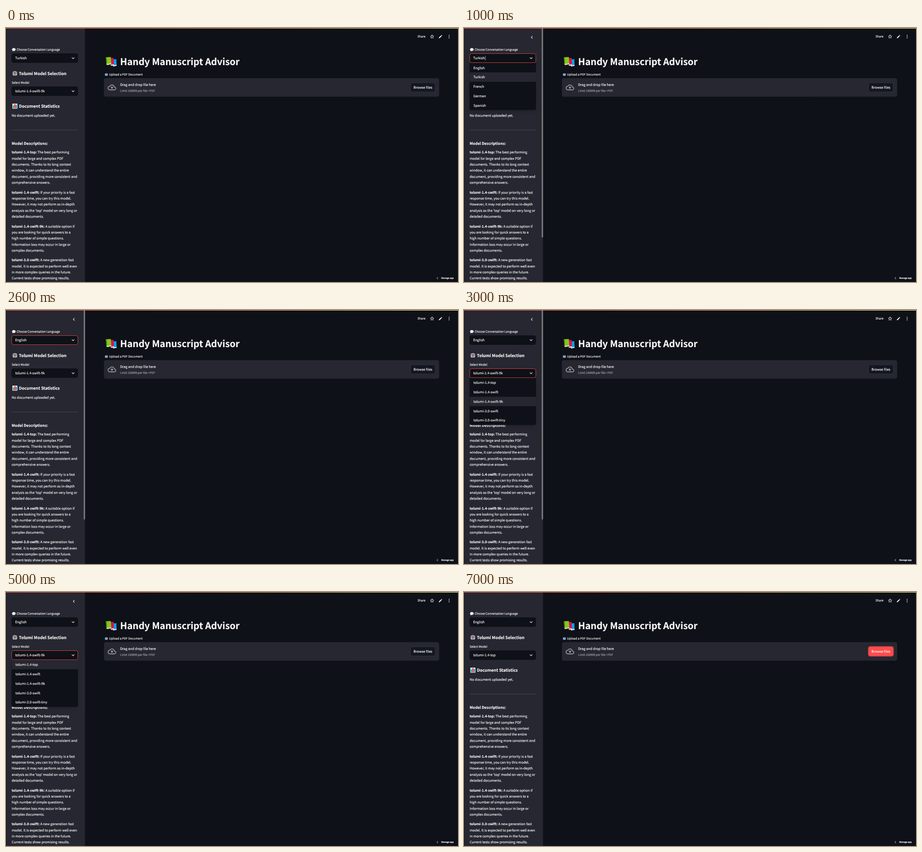
Recreate the animation shown at these times as an HTML page. Size 998 by 561 pixels, loop 8 s.

```html
<!DOCTYPE html>
<html lang="en">
<head>
<meta charset="utf-8">
<title>Document helper</title>
<style>
  html, body { margin: 0; width: 100%; height: 100%; overflow: hidden; background: #0e1117; }
  svg { display: block; width: 100vw; height: 100vh; }
  text {
    font-family: "Noto Sans CJK JP", "Noto Sans CJK SC", "Noto Sans CJK KR", "Noto Sans CJK TC", "Noto Sans CJK", "Open Sans", sans-serif;
    fill: #fafafa; stroke: #fafafa; stroke-width: .17; stroke-linejoin: round;
    text-rendering: geometricPrecision; white-space: pre;
  }
  .line { fill: none; stroke: #fafafa; stroke-linecap: round; stroke-linejoin: round; }
  .menu { filter: drop-shadow(0 2px 4px rgba(0, 0, 0, .16)); }
</style>
</head>
<body>
<svg id="stage" viewBox="0 0 998 561" preserveAspectRatio="none"></svg>
<script>
const LOOP = 8000;
const RED = '#ff4b4b', PANEL = '#262730', DARK = '#0e1117';
const BODY = 8.317, SMALL = 7.28, ROW = 20.79;
const FACE = 1.118; // the face is drawn larger per em than the sizes used here

const LANGUAGES = ['English', 'Turkish', 'French', 'German', 'Spanish'];
const MODELS = ['tolumi-1.4-top', 'tolumi-1.4-swift', 'tolumi-1.4-swift-9k', 'tolumi-3.0-swift', 'tolumi-3.0-swift-tiny'];

const ABOUT = [
  [277.3, MODELS[0], ['The best performing', 'model for large and complex PDF', 'documents. Thanks to its long context',
    'window, it can understand the entire', 'document, providing more consistent and', 'comprehensive answers.']],
  [365.8, MODELS[1], ['If your priority is a fast', 'response time, you can try this model.', 'However, it may not perform as in-depth',
    "analysis as the 'top' model on very long or", 'detailed documents.']],
  [440.7, MODELS[2], ['A suitable option if', 'you are looking for quick answers to a', 'high number of simple questions.',
    'Information loss may occur in large or', 'complex documents.']],
  [515.4, MODELS[3], ['A new generation fast', 'model. It is expected to perform well even', 'in more complex queries in the future.',
    'Current tests show promising results.']]
];

const text = (x, y, str, size = BODY, extra = '') =>
  `<text x="${x}" y="${y}" font-size="${size / FACE}" ${extra}>${str}</text>`;
const bold = (x, y, str, size) => text(x, y, str, size, 'font-weight="600"');
const rect = (x, y, w, h, fill, r = 0, extra = '') =>
  `<rect x="${x}" y="${y}" width="${w}" height="${h}" rx="${r}" fill="${fill}" ${extra}/>`;
const path = (d, fill, extra = '') => `<path d="${d}" fill="${fill}" ${extra}/>`;
const line = (d, width) => `<path class="line" d="${d}" stroke-width="${width}"/>`;
const dot = (x, y, r, fill) => `<circle cx="${x}" cy="${y}" r="${r}" fill="${fill}"/>`;

function paragraph([y, name, lines]) {
  return lines.map((s, i) => {
    const lead = i ? '' : `<tspan font-weight="600">${name}:</tspan> `;
    return text(12.5, y + i * 13.31, lead + s);
  }).join('');
}

function select(id, y) {
  return rect(12.6, y + .5, 146, 20, DARK, 3.8, `id="${id}Box" stroke-width=".8"`) +
    text(20.2, y + 13.4, '', BODY, `id="${id}Text"`) +
    line(`M145.8 ${y + 9.4}l2.4 2.4 2.4-2.4`, 1.15);
}

function menu(id, y, items) {
  const bottom = y + ROW * items.length;
  return `<g id="${id}Menu" class="menu">` +
    path(`M12.4 ${y}H159V${bottom - 4}q0 4-4 4H16.4q-4 0-4-4z`, DARK) +
    rect(12.4, y, 146.6, ROW, PANEL, 0, `id="${id}Mark"`) +
    items.map((s, i) => text(20.8, y + ROW * i + 13.3, s)).join('') + '</g>';
}

function star(cx, cy, r) {
  const points = Array.from({ length: 10 }, (_, i) => {
    const a = Math.PI * (i / 5 - .5), d = i % 2 ? r * .45 : r;
    return `${cx + d * Math.cos(a)} ${cy + d * Math.sin(a)}`;
  });
  return line(`M${points.join('L')}z`, .9);
}

const bubble = path('M17.3 44.3c2.4 0 4 1.4 4 3.2s-1.6 3.2-4 3.2l-.9-.1-2 1.2.3-1.8c-.9-.6-1.4-1.4-1.4-2.5 0-1.8 1.6-3.2 4-3.2z', '#f3f3f5');

const robot = rect(18.9, 94.4, 1.4, 2.2, '#d13438', .5) +
  rect(13.9, 98.4, 2, 4, '#d13438', .8) + rect(23.3, 98.4, 2, 4, '#d13438', .8) +
  rect(15, 95.8, 9.2, 9.2, '#c9ccd2', 2.6) + rect(15.7, 97.6, 7.8, 3.6, '#3a3d45', 1.5) +
  dot(17.6, 99.4, 1, '#fff') + dot(21.6, 99.4, 1, '#fff') + rect(17, 102.5, 5.2, 1.2, '#4a4d55', .4);

const chart = rect(14, 167, 11.2, 11.2, '#e9eef2', .8) +
  rect(15.2, 171, 2.4, 6.3, '#16a349') + rect(18.4, 168.2, 2.4, 9.1, '#e0263b') + rect(21.6, 169.7, 2.4, 7.6, '#1683d8');

const books = path('M236 69.4l7.6-.6.6 14.8-8.2 1.2z', '#0aa0ec') + path('M236 82.4l8.1-1 .1 2.2-8 1.3z', '#dff2fc') +
  path('M231 66.3l6.6-.3 1 16.4-7 1z', '#d8124f') + path('M231.6 81l6.9-.9.1 2.3-7 1z', '#f4e3ea') +
  path('M220.4 64.8l11-.9 1 14-10.7 1.4z', '#86c51b') + path('M220.4 64.8l1.8-.2 1.1 14.5-1.6.2z', '#4d8a10') +
  path('M221.7 79.3l10.7-1.4.1 2.2-10.2 1.4z', '#eef4e2') + path('M222.2 81.4l10.3-1.3v.9l-10 1.4z', '#4d8a10');

const tray = path('M218.3 102h6.5v3.7h-6.5z', '#2a8fd6') + path('M219 100.6h5.2l.6 2h-6.4z', '#b9dcf2') +
  path('M221.5 99l2 2.3h-1.2v2h-1.6v-2h-1.2z', '#d93a3f') + rect(219.6, 103.4, 3.9, 1, '#e6f3fb');

const cloud = path('M19.35 10.04A7.49 7.49 0 0 0 12 4C9.11 4 6.6 5.64 5.35 8.04A5.994 5.994 0 0 0 0 14c0 3.31 2.69 6 6 6h13c2.76 0 5-2.24 5-5 0-2.64-2.05-4.78-4.65-4.96zM19 18H6c-2.21 0-4-1.79-4-4 0-2.05 1.53-3.76 3.56-3.97l1.07-.11.5-.95A5.469 5.469 0 0 1 12 6c2.62 0 4.88 1.86 5.39 4.43l.3 1.5 1.53.11A2.98 2.98 0 0 1 22 15c0 1.65-1.35 3-3 3zM8 13h2.55v3h2.9v-3H16l-4-4z',
  '#a5a6ab', 'transform="translate(224.6 121.8) scale(.78)"');

const pencil = path('M3 17.25V21h3.75L17.81 9.94l-3.75-3.75zM20.71 7.04a1 1 0 0 0 0-1.41l-2.34-2.34a1 1 0 0 0-1.41 0l-1.83 1.83 3.75 3.75z',
  '#fafafa', 'transform="translate(954.6 14.2) scale(.4)"');

const sidebar = rect(1, 1, 173.5, 560, PANEL) +
  `<g id="collapse">${line('M150.9 18.2l-2.4 2.4 2.4 2.4', 1.1)}</g>` +
  rect(171.6, 1, 2.9, 461.5, '#7d7d82', 0, 'id="scrollbar"') +
  bubble + text(23.5, 50.3, 'Choose Conversation Language', SMALL) + select('lang', 56) +
  robot + bold(28.5, 103.6, 'Tolumi Model Selection', 10.25) +
  text(12.5, 123.1, 'Select Model', SMALL) + select('model', 129) +
  chart + bold(28.5, 176.4, 'Document Statistics', 10.25) +
  text(12.5, 196.4, 'No document uploaded yet.') +
  rect(12.4, 225.2, 146.6, .6, '#fafafa', 0, 'opacity=".24"') +
  bold(12.5, 257.6, 'Model Descriptions:', 9.2) +
  ABOUT.map(paragraph).join('') +
  menu('lang', 77.2, LANGUAGES) + menu('model', 150, MODELS) +
  rect(46.6, 62, .7, 9.4, '#fafafa', 0, 'id="caret"');

const main = text(908.5, 21.4, 'Share', SMALL) + star(940.8, 19.2, 4.1) + pencil +
  [15.9, 18.9, 21.9].map(y => dot(978.4, y, .9, '#fafafa')).join('') +
  books + text(252, 81.9, 'Handy Manuscript Advisor', 22.87, 'font-weight="700"') +
  tray + text(227.6, 105.1, 'Upload a PDF Document', SMALL) +
  rect(216.2, 110.8, 740.2, 40.9, PANEL, 4.16) + cloud +
  text(252, 128.4, 'Drag and drop file here') +
  `<g opacity=".6">${text(252, 141, 'Limit 200MB per file', SMALL)}${dot(314.2, 138.6, 1, '#fafafa')}${text(316.8, 141, 'PDF', SMALL)}</g>` +
  rect(891.8, 119.4, 57.4, 23.4, RED, 5.4, 'id="ring" opacity=".5"') +
  rect(893.3, 121, 54.4, 20.2, '#131720', 4, 'id="browse" stroke-width=".6"') +
  text(920.5, 134, 'Browse files', BODY, 'text-anchor="middle"') +
  line('M953.4 550.4l-2.1 2.1 2.1 2.1', .9) + bold(961, 554.3, 'Manage app', 5.2);

document.getElementById('stage').innerHTML =
  `<defs><linearGradient id="band"><stop stop-color="${RED}"/><stop offset="1" stop-color="#fffd80"/></linearGradient></defs>` +
  rect(0, 0, 998, 561, DARK) + sidebar + main + rect(0, 0, 998, 1.04, 'url(#band)');

const el = id => document.getElementById(id);
const show = (id, on) => el(id).setAttribute('display', on ? 'inline' : 'none');
const set = (id, name, value) => el(id).setAttribute(name, value);

function render(t) {
  const within = (a, b) => t >= a && t < b;
  const pressed = t >= 7000;

  show('collapse', within(1000, 6000));
  show('scrollbar', within(1000, 5000));
  show('langMenu', within(1000, 2000));
  show('caret', within(1000, 2000));
  show('modelMenu', within(3000, 6000));
  set('langMark', 'y', 77.2 + ROW);
  set('modelMark', 'y', 150 + (t < 5000 ? 2 * ROW : 0));

  el('langText').textContent = LANGUAGES[t < 2000 ? 1 : 0];
  el('modelText').textContent = MODELS[t < 6000 ? 2 : 0];
  set('langBox', 'stroke', within(1000, 3000) ? RED : DARK);
  set('modelBox', 'stroke', within(3000, 7000) ? RED : DARK);

  show('ring', pressed);
  set('browse', 'fill', pressed ? RED : '#131720');
  set('browse', 'stroke', pressed ? RED : '#41444c');
}

const start = performance.now();
function tick() {
  render((performance.now() - start) % LOOP);
  requestAnimationFrame(tick);
}
tick();
</script>
</body>
</html>
```
